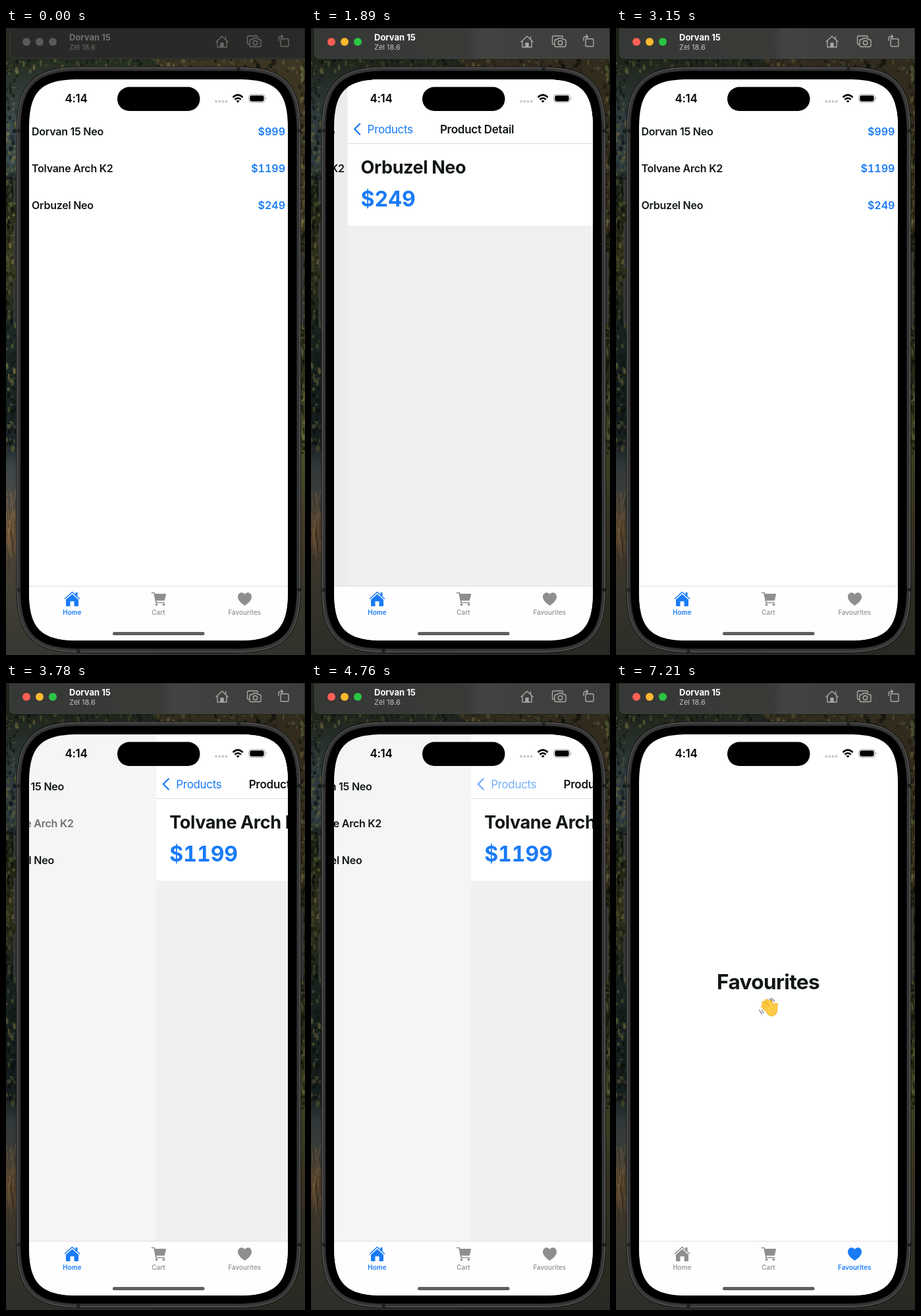
Animation, 454 px wide and 952 px high, one loop 8000 ms. Source, as an HTML page:

```html
<!DOCTYPE html>
<html lang="en">
<head>
<meta charset="utf-8">
<title>Shop app</title>
<style>
  html, body { margin: 0; width: 100%; height: 100%; overflow: hidden; background: #222; }
  svg { display: block; width: 454px; height: 952px; }
  text { font-family: Inter, sans-serif; letter-spacing: -.02em; }
  .row { font-size: 16px; font-weight: 600; fill: #111616; letter-spacing: -.015em; }
  .blue { fill: #1a7bf6; }
  .price { letter-spacing: 0; font-variant-numeric: tabular-nums; }
  .end { text-anchor: end; }
  .mid { text-anchor: middle; }
  .tab { color: #8e8e90; }
  .tab.on { color: #1a7bf6; }
  .tab text { font-size: 9.8px; font-weight: 500; letter-spacing: .01em; fill: currentColor; }
  .tab.on text { font-weight: 600; }
  .line { fill: none; stroke: currentColor; stroke-linecap: round; stroke-linejoin: round; }
  #bar { color: #6a6a69; }
  #bar.on { color: #a9aaa8; }
  #bar .name { fill: #6f6f6e; }
  #bar.on .name { fill: #fff; }
  #bar .os { fill: #686867; }
  #bar.on .os { fill: #c3c4c2; }
  #bar circle.light { fill: #5a5a59; }
  #bar.on circle.light { fill: var(--c); }
  #bar .back { fill: #292927; }
  #bar.on .back { fill: url(#glass); }
</style>
</head>
<body>
<svg viewBox="0 0 454 952">
  <defs>
    <clipPath id="screen"><path data-box="35 78 393 852 55"/></clipPath>
    <linearGradient id="glass">
      <stop offset="0" stop-color="#363836"/><stop offset=".52" stop-color="#3a3b38"/>
      <stop offset=".55" stop-color="#424340"/><stop offset="1" stop-color="#3d3e3b"/>
    </linearGradient>
    <linearGradient id="left" x2="0" y2="1">
      <stop offset=".05" stop-color="#262d20"/><stop offset=".14" stop-color="#38464a"/>
      <stop offset=".22" stop-color="#3a4a4e"/><stop offset=".25" stop-color="#1c2318"/>
      <stop offset=".36" stop-color="#3b3c20"/><stop offset=".48" stop-color="#1c2823"/>
      <stop offset=".66" stop-color="#1a2526"/><stop offset=".7" stop-color="#3c4548"/>
      <stop offset=".76" stop-color="#4c4a42"/><stop offset=".8" stop-color="#735939"/>
      <stop offset=".85" stop-color="#4a4236"/><stop offset="1" stop-color="#353731"/>
    </linearGradient>
    <linearGradient id="right" x2="0" y2="1">
      <stop offset=".05" stop-color="#3c3524"/><stop offset=".3" stop-color="#40351f"/>
      <stop offset=".5" stop-color="#29281a"/><stop offset=".65" stop-color="#4a5127"/>
      <stop offset=".8" stop-color="#403a28"/><stop offset="1" stop-color="#30322b"/>
    </linearGradient>
  </defs>

  <rect width="227" height="952" fill="url(#left)"/>
  <rect x="227" width="227" height="952" fill="url(#right)"/>
  <g id="leaves"></g>
  <rect id="shade" width="454" height="952" opacity=".18"/>

  <g id="bar">
    <path class="back" d="M5 0H454V47H14Q5 47 5 38Z" stroke="#191a18"/>
    <path d="M5.500 0V38Q5.500 46.500 14 46.500H454" fill="none" stroke="#6b6c69" stroke-opacity=".55" stroke-width=".7"/>
    <circle class="light" cx="31" cy="21" r="6" style="--c:#fe5f55"/>
    <circle class="light" cx="51" cy="21" r="6" style="--c:#fcb92f"/>
    <circle class="light" cx="71" cy="21" r="6" style="--c:#2bc544"/>
    <text class="name" x="96" y="19" font-size="13" font-weight="700" style="letter-spacing:0">Dorvan 15</text>
    <text class="os" x="96" y="33" font-size="11" style="letter-spacing:0">Zel 18.6</text>
    <g class="line" stroke-width="1.400">
      <path d="M319 21L328 12.500L337 21M321 19.500V29H335V19.500M333.500 17V13"/>
      <path d="M326 29V23H330V29" fill="currentColor"/>
      <path d="M369 25Q366.500 25 366.500 22.500V14.500Q366.500 12 369 12H380Q382.500 12 382.500 14"/>
      <path d="M372 17.500H374L375.500 15.500H381.500L383 17.500H385Q387 17.500 387 19.500V26.500Q387 28.500 385 28.500H372Q370 28.500 370 26.500V19.500Q370 17.500 372 17.500Z"/>
      <circle cx="378.500" cy="22.500" r="3.200"/>
      <rect x="417" y="16.500" width="12" height="11.500" rx="1.500"/>
      <path d="M414 19V16Q414 13 417 13H420M418 10.500L420.500 13L418 15.500"/>
    </g>
  </g>

  <g fill="#303030" stroke="#555" stroke-width=".7">
    <rect x="12" y="232" width="6" height="33" rx="1"/>
    <rect x="12" y="297" width="6" height="67" rx="1"/>
    <rect x="12" y="382" width="6" height="66" rx="1"/>
    <rect x="446" y="342" width="5" height="106" rx="1"/>
  </g>
  <path data-box="15.5 58.5 432.5 890.5 74" fill="#0b0b0b"/>
  <path data-box="17 60 429.5 887.5 72.5" fill="#363636" stroke="#6a6a6a"/>
  <path d="M17 156H23M441 156H447M17 853H23M441 853H447M353 60V66M110 942V948" stroke="#202020" stroke-width="5"/>
  <path data-box="22 65 419.5 877.5 68" stroke="#1c1c1c"/>

  <g clip-path="url(#screen)">
    <rect x="35" y="78" width="393" height="852" fill="#fff"/>
    <g id="list"></g>
    <rect id="dim" x="35" y="78" width="393" height="770"/>
    <g id="card">
      <rect x="35" y="78" width="393" height="770" fill="#f0f0f0"/>
      <rect x="35" y="78" width="393" height="222" fill="#fff"/>
      <path d="M35 175.500H428" stroke="#dcdcdc"/>
      <g id="back">
        <path d="M53.500 145.500L45.500 153.500L53.500 161.500" fill="none" stroke="#1a7bf6" stroke-width="2.400" stroke-linecap="round" stroke-linejoin="round"/>
        <text class="blue" x="65" y="160" font-size="17">Products</text>
      </g>
      <text class="row mid" x="231.500" y="160" style="font-size:17px">Product Detail</text>
      <text id="title" class="row" x="55" y="221" style="font-size:27px;font-weight:650"></text>
      <text id="cost" class="row blue price" x="55" y="271" style="font-size:32px;font-weight:650"></text>
    </g>
    <g id="page">
      <text id="heading" class="mid" x="231" y="465" font-size="31.500" font-weight="700" fill="#111616"></text>
      <g fill="none" stroke-linecap="round">
        <g stroke="#f0ae27" stroke-width="5.400">
          <path d="M223 491L232 499M224 485.500L235 496M228.500 482.500L238 493M234 483.500L240 493M243 488.500L242 498"/>
          <circle cx="236.500" cy="498" r="5.500" fill="#f0ae27"/>
        </g>
        <g stroke="#fdcb45" stroke-width="3.800">
          <path d="M223 491L232 499M224 485.500L235 496M228.500 482.500L238 493M234 483.500L240 493M243 488.500L242 498"/>
          <circle cx="236.500" cy="498" r="5.500" fill="#fdcb45"/>
        </g>
        <path d="M232.500 479.500Q236 480 237.500 483.500M236 478.500Q239.500 480 240.500 484M218 496Q218.500 500 222 502.500M221.500 496.500Q222 499 224.500 501" stroke="#777" stroke-width="1.100"/>
      </g>
    </g>

    <rect x="35" y="847" width="393" height="83" fill="#fefefe"/>
    <path d="M35 847.500H428" stroke="#dedede"/>
    <g class="tab">
      <g fill="currentColor">
        <path d="M91 868L100.500 859.500L110 868V877Q110 878 109 878H103.500V870.500H97.500V878H92Q91 878 91 877Z"/>
        <path d="M105.500 857H108.500V863H105.500Z"/>
      </g>
      <path class="line" stroke-width="1.600" d="M89.500 866.500L100.500 856.500L111.500 866.500"/>
      <text class="mid" x="100.500" y="891">Home</text>
    </g>
    <g class="tab">
      <path class="line" stroke-width="1.700" d="M221.500 857.500H225L228 872.500H240.500"/>
      <path fill="currentColor" d="M225 859H242Q243.200 859 243 860.200L241 868.500Q240.800 869.500 239.500 869.500H227.500Z"/>
      <circle cx="228.500" cy="875.500" r="1.800" fill="currentColor"/>
      <circle cx="239.500" cy="875.500" r="1.800" fill="currentColor"/>
      <text class="mid" x="231.500" y="891">Cart</text>
    </g>
    <g class="tab">
      <path fill="currentColor" d="M362.500 877C358 874 352 869.500 352 863.500C352 857 359.500 855 362.500 860C365.500 855 373 857 373 863.500C373 869.500 367 874 362.500 877Z"/>
      <text class="mid" x="362.300" y="891">Favourites</text>
    </g>
    <rect x="162" y="917" width="139.500" height="5" rx="2.500" fill="#5e5e5e"/>

    <text class="mid" x="106.500" y="113" font-size="17" font-weight="600">4:14</text>
    <rect x="169" y="89.500" width="125.500" height="36.500" rx="18.250"/>
    <path d="M319 111.500H336" stroke="#c9c9c9" stroke-width="4" stroke-linecap="round" stroke-dasharray="0 5.200"/>
    <g fill="none" stroke="#000" stroke-width="2.600">
      <path d="M344.500 105.200Q352 98.200 359.500 105.200M347.300 108.600Q352 104.400 356.700 108.600"/>
      <path d="M349.500 110.800Q352 108.800 354.500 110.800L352 113.600Z" fill="#000" stroke="none"/>
    </g>
    <rect x="368.700" y="101" width="24.500" height="12" rx="3.800" fill="none" stroke="#a5a5a5"/>
    <rect x="370.300" y="102.600" width="21.300" height="8.800" rx="2.400"/>
    <path d="M394.500 105.300Q397 107 394.500 108.700Z" fill="#a5a5a5"/>
  </g>
</svg>
<script>
const LOOP = 8000, STEP = 70, WIDTH = 393;
const products = [['Dorvan 15 Neo', '$999'], ['Tolvane Arch K2', '$1199'], ['Orbuzel Neo', '$249']];
const $ = id => document.getElementById(id);
const tabs = document.querySelectorAll('.tab');

// Rounded boxes with continuous-curvature corners.
for (const path of document.querySelectorAll('[data-box]')) {
  const [x, y, w, h, radius] = path.dataset.box.split(' ').map(Number);
  const e = radius * 1.36, c = e * .24, right = x + w, bottom = y + h;
  path.setAttribute('d', `M${x + e} ${y}H${right - e}C${right - c} ${y} ${right} ${y + c} ${right} ${y + e}
    V${bottom - e}C${right} ${bottom - c} ${right - c} ${bottom} ${right - e} ${bottom}
    H${x + e}C${x + c} ${bottom} ${x} ${bottom - c} ${x} ${bottom - e}
    V${y + e}C${x} ${y + c} ${x + c} ${y} ${x + e} ${y}Z`);
}

$('list').innerHTML = products.map(([name, price], i) => `<g>
  <text class="row" x="39" y="${163 + i * 56}">${name}</text>
  <text class="row blue price end" x="424" y="${163 + i * 56}">${price}</text></g>`).join('');
const rows = $('list').children;

// Soft foliage specks along the visible edges of the wallpaper.
let seed = 7;
const random = () => (seed = seed * 16807 % 2147483647) / 2147483647;
const tones = ['#080d0a', '#8a7d48', '#0c120c', '#5c6a3c', '#10140e'];
let leaves = '';
for (let i = 0; i < 700; i++) {
  const onTop = random() < .25, onLeft = random() < .6;
  const x = onTop ? random() * 454 : onLeft ? random() * 17 : 446 + random() * 8;
  const y = onTop ? 46 + random() * 22 : 50 + random() * 600;
  leaves += `<ellipse cx="${x}" cy="${y}" rx="${1 + random() * 2}" ry="${1 + random() * 4}"
    fill="${tones[i % 5]}" opacity="${.2 + random() * .5}"/>`;
}
// Dry grass stems low on the left.
for (let i = 0; i < 26; i++) {
  const x = random() * 16, y = 700 + random() * 90;
  leaves += `<path d="M${x} ${y}l${random() * 10 - 5} ${20 + random() * 30}"
    stroke="${i % 2 ? '#a57f52' : '#2c271f'}" opacity=".5"/>`;
}
$('leaves').innerHTML = leaves;

// Critically damped spring from 0 to 1.
const spring = ms => {
  const x = Math.max(0, ms) * .0142;
  return 1 - (1 + x) * Math.exp(-x);
};
const press = (t, down, up) =>
  t < down ? 1 : t < up ? .2 : Math.min(1, .2 + .8 * (t - up) / 250);

function draw(now) {
  const t = Math.floor(now % LOOP / STEP) * STEP;
  const active = t >= 1470;
  const tab = t < 6090 ? 0 : t < 7210 ? 1 : 2;
  const open = spring(t - 1560) - spring(t - 2629) + spring(t - 3660) - spring(t - 4635);
  const [name, price] = products[t < 3400 ? 2 : 1];

  $('bar').classList.toggle('on', active);
  $('shade').style.display = active ? '' : 'none';
  tabs.forEach((el, i) => el.classList.toggle('on', i == tab));

  $('list').style.display = tab ? 'none' : '';
  $('list').setAttribute('transform', `translate(${-.3 * WIDTH * open})`);
  rows[2].style.opacity = press(t, 1540, 1600);
  rows[1].style.opacity = press(t, 3570, 3660);
  $('dim').style.opacity = .08 * open;

  $('card').style.display = open > .0005 ? '' : 'none';
  $('card').setAttribute('transform', `translate(${WIDTH * (1 - open)})`);
  $('back').style.opacity = press(t, ...(t < 3400 ? [2590, 2629] : [4550, 4635]));
  $('title').textContent = name;
  $('cost').textContent = price;

  $('page').style.display = tab ? '' : 'none';
  $('heading').textContent = tab == 1 ? 'Shopping Cart' : 'Favourites';
  requestAnimationFrame(draw);
}
requestAnimationFrame(draw);
</script>
</body>
</html>
```
